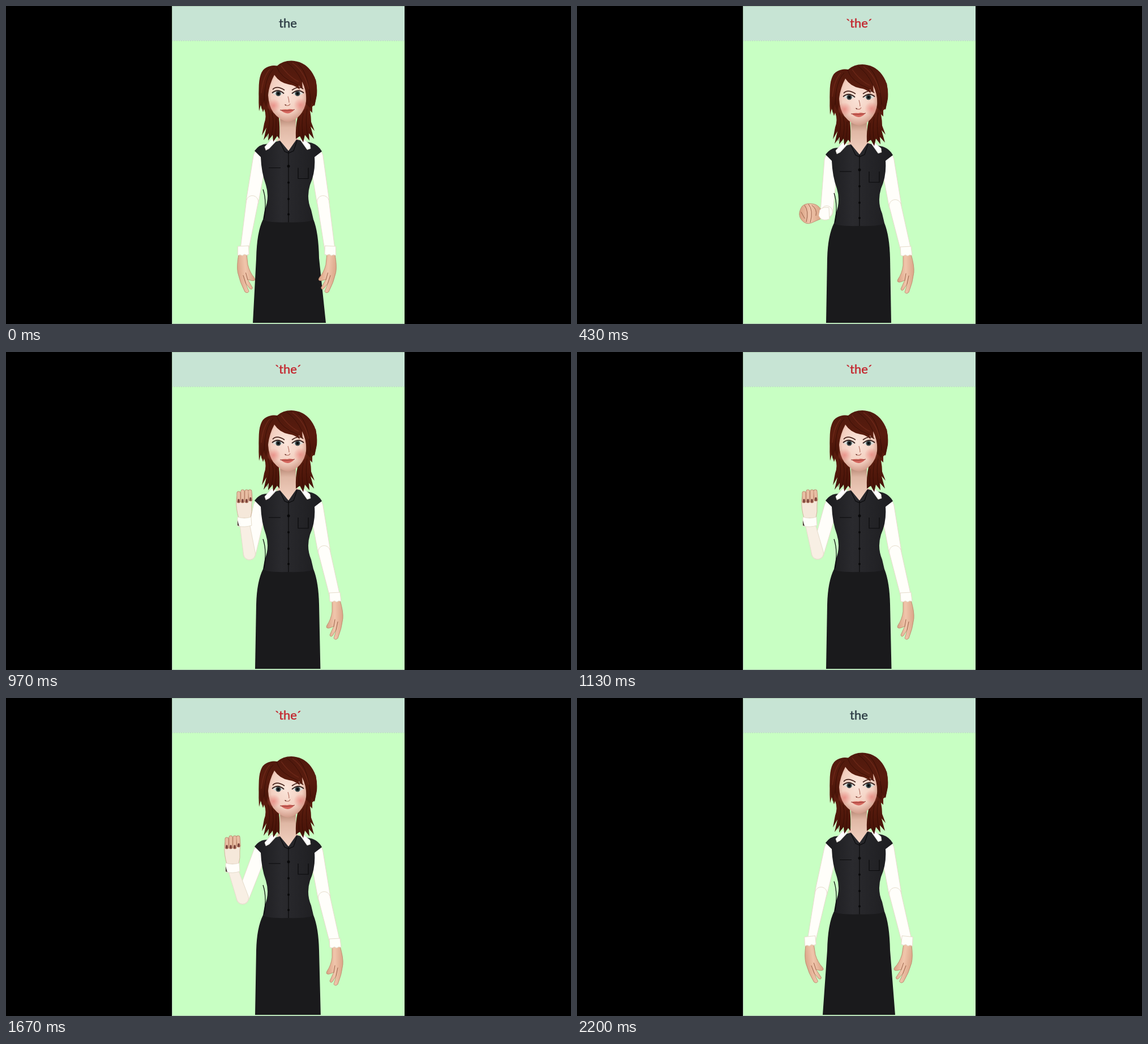
Animation of 998 by 561 pixels, one loop 2230 ms. Source, as an HTML page:

```html
<!DOCTYPE html>
<html lang="en">
<head>
<meta charset="utf-8">
<title>Signing avatar</title>
<style>
  html, body { margin: 0; width: 100%; height: 100%; overflow: hidden; background: #000; }
  svg { display: block; width: 998px; height: 561px; }
  text { font: 22px Lato, sans-serif; text-anchor: middle; stroke-width: .45; }
  .sleeve, .cuff { fill: #fffefa; stroke: #e6dccb; stroke-width: 1; stroke-linejoin: round; }
  .skin { fill: url(#skin); stroke: #b98368; stroke-width: .8; stroke-linejoin: round; }
  .line { fill: none; stroke: #9a6149; stroke-width: 1; stroke-linecap: round; }
  .fingers { fill: none; stroke-linecap: round; }
  .strand { fill: none; stroke: #2b0903; stroke-width: 1; opacity: .6; }
  .shine { fill: none; stroke: #7a3020; stroke-width: 1.6; opacity: .55; }
  .seam { fill: none; stroke: #0b0b0d; stroke-width: 1.2; }
</style>
</head>
<body>
<svg viewBox="0 0 998 561">
  <defs>
    <linearGradient id="skin"><stop offset="0" stop-color="#d9a183"/><stop offset=".5" stop-color="#f0c5ab"/><stop offset="1" stop-color="#dba588"/></linearGradient>
    <radialGradient id="face" cx=".48" cy=".42" r=".62"><stop offset="0" stop-color="#fbe6db"/><stop offset=".65" stop-color="#f3cfc0"/><stop offset="1" stop-color="#c98f7d"/></radialGradient>
    <radialGradient id="blush"><stop offset="0" stop-color="#e5706c" stop-opacity=".6"/><stop offset="1" stop-color="#e5706c" stop-opacity="0"/></radialGradient>
    <linearGradient id="neck" x2="0" y2="1"><stop offset="0" stop-color="#a97663"/><stop offset=".35" stop-color="#dfb7a4"/><stop offset="1" stop-color="#f3d3c3"/></linearGradient>
    <linearGradient id="hair" x2="0" y2="1"><stop offset="0" stop-color="#4f190d"/><stop offset=".5" stop-color="#591c0e"/><stop offset="1" stop-color="#451207"/></linearGradient>
    <linearGradient id="vest"><stop offset="0" stop-color="#1b1b1e"/><stop offset=".4" stop-color="#2a2a2e"/><stop offset="1" stop-color="#1d1d20"/></linearGradient>

    <g id="down">
      <path class="skin" d="M-5 0H9Q15 20 14 32Q12 50 5 67Q1 71-2 67Q1 58 2 52L-4 62Q-8 66-9 61L-2 46L-10 49Q-17 50-14 44Q-7 34-5 20Z"/>
      <path class="line" d="M2 52L5 38M-2 46L0 34"/>
      <path class="cuff" d="M-10-13L9-14L11 2L7 1L3 3L-1 1L-5 3L-9 2Z"/>
    </g>
  </defs>

  <rect x="293" width="411" height="561" fill="#c8ffc3"/>
  <rect x="293" width="411" height="61" fill="#c7e4d4"/>
  <path d="M293 61.5H704" stroke="#bcd9c4" stroke-dasharray="2 2"/>
  <path d="M293.5 0V561M293 560.5H704M293 .5H704" stroke="#a9c7ae" fill="none"/>

  <g id="label">
    <text x="498" y="38">the</text>
    <g id="quotes"><text x="479.5" y="38">`</text><text x="517" y="38">´</text></g>
  </g>

  <path id="upperL" class="sleeve"/>
  <path id="upperR" class="sleeve"/>
  <path id="skirt" fill="#1a1a1c"/>

  <g id="body">
    <path d="M484 198H512V238L519 243L499 263L478 243L484 236Z" fill="url(#neck)"/>
    <path d="M439 262Q448 250 460 250L484 244L499 262L513 242L540 248Q552 252 558 263L545 273Q547 300 537 322Q530 345 539 366L543 383Q536 389 498 388Q460 389 454 383L457 366Q466 345 459 322Q451 300 450 273Z" fill="url(#vest)"/>
    <path class="seam" d="M499 262V388M484 246L492 263L499 266L508 262L514 244M454 330Q461 350 456 382M516 292V311H534V292M464 292H485"/>
    <g fill="#09090a"><circle cx="499" cy="289" r="2.5"/><circle cx="499" cy="318" r="2"/><circle cx="499" cy="347" r="2"/><circle cx="499" cy="374" r="2"/></g>
    <path d="M469 241L478 244L465 258L459 261L457 255ZM526 241L520 243L532 260L538 258L537 251Z" fill="#fff" stroke="#d6cec2" stroke-width=".7"/>

    <g fill="url(#hair)">
      <path d="M449 133Q445 160 447 192L450 181L454 194L456 188Q461 201 456 214L452 235L460 221L455 243L464 231L463 244L471 234L472 246L479 236L483 241Q484 219 482 203L470 175Z"/>
      <path d="M547 135Q551 160 545 181L541 184L541 195L537 191Q539 202 539 211L545 227L538 219L544 241L535 231L536 244L528 234L525 247L519 236L512 241Q511 219 515 203L526 175Z"/>
    </g>
    <path class="strand" d="M463 188Q469 208 461 238M470 195Q475 215 468 238M477 204Q478 220 475 238M532 188Q528 210 533 236M525 196Q521 217 525 239M518 206Q516 222 518 237M452 142Q449 160 453 187"/>

    <path d="M473 122Q464 143 463 164Q464 182 472 194Q484 209 498 211Q513 209 523 194Q531 182 531 162Q530 140 519 124Z" fill="url(#face)"/>
    <circle cx="473" cy="182" r="12" fill="url(#blush)"/><circle cx="520" cy="181" r="12" fill="url(#blush)"/>
    <g id="eye">
      <path d="M471 161Q480 152 490 161Q481 168 471 161Z" fill="#d9dcd9"/>
      <circle cx="481" cy="161" r="4.5" fill="#394749"/><circle cx="481" cy="161" r="2.4" fill="#0b0d0e"/>
      <path d="M470 160Q480 151 491 161" fill="none" stroke="#34201d" stroke-width="1.8"/>
    </g>
    <use href="#eye" transform="translate(996) scale(-1 1)"/>
    <path d="M471 154Q478 146 492 155M505 155Q518 146 525 153" fill="none" stroke="#46231c" stroke-width="1.7"/>
    <path d="M492 180Q494 183 497 182Q500 183 502 179M498 166Q500 172 500 177" fill="none" stroke="#b77668" stroke-width="1.2"/>
    <circle cx="494" cy="181" r="1.1" fill="#70413a"/>
    <path d="M485 190Q492 188 497 189Q502 187 509 190Q503 196 497 196Q490 195 485 190Z" fill="#d4675e"/>
    <path d="M484 190Q497 193 510 189" fill="none" stroke="#8f3832"/>

    <path d="M447 166Q444 122 460 115Q469 110 479 112Q489 103 504 103Q529 104 542 126Q551 140 549 164L545 183L540 176L538 187L530 179Q532 157 523 140L524 153L517 147L519 154Q510 146 500 145Q483 142 474 128Q465 145 463 163L460 185L455 175L452 189Z" fill="url(#hair)"/>
    <path class="strand" d="M478 113Q484 133 516 146M496 106Q513 118 523 140M515 107Q535 126 538 174M472 118Q457 132 456 174"/>
    <path class="shine" d="M486 112Q500 132 517 140M506 107Q527 121 535 153M466 118Q454 131 451 160"/>
  </g>

  <path id="foreR" class="sleeve"/>
  <use id="handR" href="#down"/>
  <path id="foreL" class="sleeve"/>
  <g id="handL">
    <use id="low" href="#down" transform="scale(-1 1)"/>
    <g id="front">
      <path class="skin" d="M-2-9Q-8-18-19-18Q-33-19-37-9Q-42 2-36 10Q-28 20-18 16L-2 9Z"/>
      <path class="line" d="M-30-15Q-22-5-27 14M-23-17Q-14-6-20 15M-36-3L-30 8M-17-15Q-7-8-10 3"/>
      <path class="cuff" d="M-3-7Q2-13 13-11L14 9Q4 13-2 8L-5 3Z"/>
    </g>
    <g id="raised">
      <path d="M-10-7Q-15-24-14-38Q-13-52-7-53L11-56Q15-45 13-30Q14-18 11-7Z" fill="#f5e8da" stroke="#c9a88f" stroke-width=".8"/>
      <path class="fingers" d="M-10-51L-10-37M-3-54L-3-37M4-54L4-37M10-54L11-40" stroke="#b67f66" stroke-width="7"/>
      <path class="fingers" d="M-10-51L-10-38M-3-54L-3-38M4-54L4-38M10-54L11-41" stroke="#e8bea3" stroke-width="5.4"/>
      <path class="fingers" d="M-10-39V-36M-3-39V-36M4-39V-36M11-42V-39" stroke="#763d35" stroke-width="3.4"/>
      <path class="cuff" d="M-12-9Q0-5 12-9L13 6Q0 10-12 7Z"/>
      <path d="M-12-3L-9 7L-12 6Z" fill="#4a4038"/>
    </g>
  </g>
</svg>
<script>
const LOOP = 2230;
const el = Object.fromEntries([...document.querySelectorAll('[id]')].map(e => [e.id, e]));

// time, elbow x/y, wrist x/y, hand height
const signing = [
  [0, 435, 345, 420, 437, 1],
  [30, 435, 345, 420, 437, 1],
  [290, 438, 356, 421, 408, 1],
  [430, 441, 363, 432, 367, .6],
  [530, 441, 362, 434, 336, .65],
  [630, 440, 358, 434, 311, .9],
  [970, 430, 356, 421, 300, 1],
  [1130, 425, 355, 411, 300, 1],
  [1400, 418, 353, 400, 300, 1],
  [1720, 418, 353, 400, 300, 1],
  [1850, 425, 357, 407, 334, .8],
  [1950, 434, 359, 420, 372, .8],
  [2070, 432, 352, 414, 412, 1],
  [2200, 431, 344, 413, 434, 1]
];
// time, lift, elbow x/y, wrist x/y, hand angle, hem left/right
const stance = [
  [0, 6.5, 560, 345, 572, 437, 6, 436, 565],
  [30, 6.5, 560, 345, 572, 437, 6, 436, 565],
  [400, 0, 562, 352, 581, 438, 0, 440, 555],
  [1850, 0, 562, 352, 581, 438, 0, 440, 556],
  [2200, 6.5, 562, 345, 582, 434, 9, 434, 562]
];

function sample(table, t) {
  const i = table.findIndex(row => row[0] > t);
  if (i < 0) return table[table.length - 1].slice(1);
  const a = table[i - 1], b = table[i], k = (t - a[0]) / (b[0] - a[0]);
  return a.slice(1).map((v, j) => v + (b[j + 1] - v) * k);
}

// Tapered segment with round ends
function limb(x1, y1, r1, x2, y2, r2) {
  const len = Math.hypot(x2 - x1, y2 - y1) || 1;
  const nx = (y1 - y2) / len, ny = (x2 - x1) / len;
  const at = (x, y, r) => `${x + nx * r} ${y + ny * r}`;
  return `M${at(x1, y1, r1)}L${at(x2, y2, r2)}A${r2} ${r2} 0 0 0 ${at(x2, y2, -r2)}` +
    `L${at(x1, y1, -r1)}A${r1} ${r1} 0 0 0 ${at(x1, y1, r1)}Z`;
}

const show = (node, on) => node.setAttribute('visibility', on ? 'visible' : 'hidden');
const move = (node, value) => node.setAttribute('transform', value);
const path = (node, d) => node.setAttribute('d', d);

function draw(t) {
  const [ex, ey, wx, wy, tall] = sample(signing, t);
  const [lift, rx, ry, vx, vy, turn, hemL, hemR] = sample(stance, t);
  const hand = t < 350 || t >= 2010 ? 'low' : t < 510 || t >= 1870 ? 'front' : 'raised';
  const active = t >= 100 && t < 2150;
  const color = active ? '#c4262e' : '#2c3c44';

  el.label.setAttribute('fill', color);
  el.label.setAttribute('stroke', color);
  show(el.quotes, active);

  move(el.body, `translate(0 ${-lift})`);
  const hip = 383 - lift;
  path(el.skirt, `M454 ${hip}Q443 ${hip + 22} 442 445L${hemL} 559H${hemR}L553 445Q552 ${hip + 22} 543 ${hip}Z`);

  path(el.upperR, limb(548, 272 - lift, 12, rx, ry, 11));
  path(el.foreR, limb(rx, ry, 10.5, vx, vy - 7, 9));
  move(el.handR, `translate(${vx} ${vy}) rotate(${turn})`);

  path(el.upperL, limb(449, 272 - lift, 12, ex, ey, 11));
  path(el.foreL, limb(ex, ey, 10.5, wx, wy, hand === 'raised' ? 8.5 : 7));
  el.foreL.style.fill = hand === 'raised' ? '#f8efe4' : '';
  move(el.handL, `translate(${wx} ${wy}) ` +
    (hand === 'low' ? `rotate(${-turn})` : hand === 'raised' ? `scale(1 ${tall})` : ''));
  for (const name of ['low', 'front', 'raised']) show(el[name], name === hand);
}

const start = performance.now();
function tick() {
  draw((performance.now() - start) % LOOP);
  requestAnimationFrame(tick);
}
tick();
</script>
</body>
</html>
```
